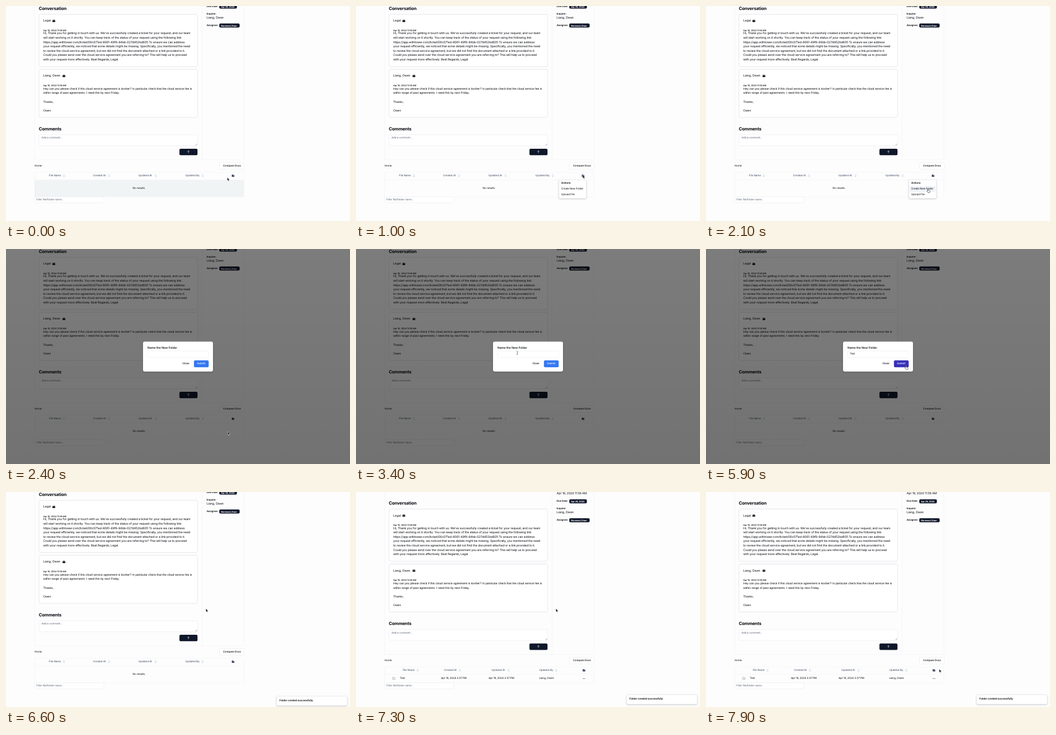
An HTML page that plays this animation: 600 by 375 pixels, repeating every 8 s.

```html
<!DOCTYPE html>
<html lang="en">
<head>
<meta charset="utf-8">
<title>New folder</title>
<style>
  html, body { margin: 0; height: 100%; overflow: hidden; background: #fdfdfd; }
  svg { display: block; width: 100vw; height: 100vh; }
  text {
    font: 4.55px Inter, sans-serif; letter-spacing: -.02em; fill: #05070c;
    dominant-baseline: central; text-rendering: geometricPrecision; white-space: pre;
  }
  .body { font-size: 5.23px; }
  .mail { font: 5.08px "Liberation Sans", Arial, sans-serif; letter-spacing: 0; fill: #000; }
  .head { font-size: 7.65px; font-weight: 700; }
  .date { font-size: 3.95px; font-weight: 500; }
  .label { font-size: 4.35px; font-weight: 600; }
  .badge { font-size: 3.85px; font-weight: 700; fill: #fff; }
  .medium { font-weight: 500; }
  .bold { font-weight: 600; }
  .column { font-weight: 500; fill: #566378; }
  .hint { fill: #566172; }
  .white { font-weight: 500; fill: #fff; }
  .card { fill: #fff; stroke: #e2e5ea; stroke-width: .5; }
  .line { fill: none; stroke: #eceef1; stroke-width: .5; }
  .icon { fill: none; stroke: #64748b; stroke-width: .5; }
  .shadow { filter: drop-shadow(0 .5px .6px #0003); }
  .float { filter: drop-shadow(0 1px 1.5px #0003); }
</style>
</head>
<body>
<svg id="stage" viewBox="0 0 600 375"></svg>
<script>
const LOOP = 8000, SHIFT = 15.2, INK = '#0f172a';
const PERSON = 'Liang, Owen';

const text = (x, y, str, cls = '', attrs = '') => `<text x="${x}" y="${y + .35}" class="${cls}" ${attrs}>${str}</text>`;
const lines = (x, y, step, rows, cls) => rows.map((row, i) => row && text(x, y + i * step, row, cls)).join('');
const rect = (x, y, x2, y2, attrs = 'class="card"', r = 2) =>
  `<rect x="${x}" y="${y}" width="${x2 - x}" height="${y2 - y}" rx="${r}" ${attrs}/>`;
const path = (d, attrs) => `<path d="${d}" ${attrs}/>`;
const group = (id, content) => `<g id="${id}">${content}</g>`;

const envelope = (x, y) => rect(x - 2.3, y - 1.8, x + 2.3, y + 1.8, 'fill="#05070c"', .5) +
  path(`M${x - 2} ${y - 1.1}l2 1.3 2-1.3`, 'fill="none" stroke="#fff" stroke-width=".45"');
const badge = (y, x2, str) => rect(372, y - 3.5, x2, y + 3.5, `fill="${INK}"`) + text(375, y - .2, str, 'badge');

function message(top, bottom, sender, iconX) {
  return rect(57.5, top, 334, bottom, 'class="card shadow"', 3) +
    text(65, top + 11.6, sender, 'body') + envelope(iconX, top + 11.6) +
    text(65, top + 27.3, 'Apr 19, 2024 11:58 AM', 'date');
}

function header(y, columns, iconX) {
  const titles = ['File Name', 'Created At', 'Updated At', 'Updated By'], gaps = [26, 28, 30, 30];
  return titles.map((title, i) => text(columns[i], y, title, 'column') +
    path(`M${columns[i] + gaps[i] - 1.1} ${y - .7}l1.1-1.1 1.1 1.1m-2.2 1.4l1.1 1.1 1.1-1.1`, 'class="icon"')).join('') +
    path(`M${iconX - 2.1} ${y - 1.9}h1.6l.6.7h2v3.1h-4.2z`, 'fill="#263352"') +
    path(`M${iconX - .9} ${y + .4}h1.8m-.9-.9v1.8`, 'stroke="#fff" stroke-width=".4"');
}

const page = rect(50, -30, 415, 268, 'class="line"', 0) + path('M342 -30V268', 'class="line"') +
  text(57.3, 4, 'Conversation', 'head') +
  message(14.5, 105.5, 'Legal', 83.4) +
  lines(65, 48, 7.6, [
    "Hi, Thank you for getting in touch with us. We've successfully created a ticket for your request, and our team",
    'will start working on it shortly. You can keep track of the status of your request using the following link:',
    'https://app.withtower.com/ticket/06c071ed-8061-49f8-94bb-027d452bd605 To ensure we can address',
    'your request efficiently, we noticed that some details might be missing. Specifically, you mentioned the need',
    'to review the cloud service agreement, but we did not find the document attached or a link provided to it.',
    'Could you please send over the cloud service agreement you are referring to? This will help us to proceed',
    'with your request more effectively. Best Regards, Legal'], 'body') +
  message(110.5, 194, PERSON, 101) +
  lines(65, 144.4, 7.6, [
    'Hey can you please check if this cloud service agreement is kosher? In particular check that the cloud service fee is',
    'within range of past agreements. I need this by next Friday.', '', 'Thanks,', '', 'Owen'], 'mail') +
  text(57.3, 214.3, 'Comments', 'head') +
  rect(57.5, 224.7, 334, 243.7) + text(62, 230.6, 'Add a comment...', 'hint') +
  path('M330.5 242.8l2.6-2.6m-1.2 2.6l1.2-1.2', 'class="icon"') +
  rect(302.5, 249, 334, 260.3, `fill="${INK}"`) +
  path('M318.2 256.7v-4.2m-1.7 1.7l1.7-1.7 1.7 1.7', 'fill="none" stroke="#fff" stroke-width=".6"') +
  text(350, -12.2, 'Apr 19, 2024 11:58 AM', 'body') +
  text(350, 1, 'Due Date:', 'label') + badge(1, 402.7, 'Apr 25, 2024') +
  text(350, 13.7, 'Inquirer:', 'label') + text(350, 20.7, PERSON, 'body') +
  text(350, 34, 'Assignee:', 'label') + badge(34, 407.5, 'Norwood, Evan') +
  text(50, 279, 'Home') + rect(372.5, 273.2, 415.5, 284.8) + text(378.6, 279, 'Compare Docs', 'medium');

const emptyTable = rect(50, 303.3, 415, 333, 'id="rowHover" fill="#f1f4f4"', 0) +
  rect(50, 290, 415, 333, 'class="line"', 1) + path('M50 303.3H415', 'class="line"') +
  header(296, [75, 151.7, 231, 313], 396) + text(221, 317.7, 'No results.');

const filledTable = rect(50, 305, 415, 333, 'class="line"', 1) + path('M50 318H415', 'class="line"') +
  header(311, [81.4, 153.3, 236.3, 319.4], 397.6) +
  path('M64 323.2h1.5l.5.6h2v3h-4z', 'class="icon"') + text(76.4, 325.2, 'Test') +
  text(148.3, 325.2, 'Apr 19, 2024 3:37 PM') + text(231.3, 325.2, 'Apr 19, 2024 3:37 PM') +
  text(319.4, 325.2, PERSON) +
  [-1.6, 0, 1.6].map(dx => `<circle cx="${397.7 + dx}" cy="325.2" r=".5" fill="${INK}"/>`).join('');

const menu = rect(354, 303.3, 401.5, 335.5, 'class="card float"') +
  rect(355.5, 314.2, 400, 324.2, 'id="itemHover" fill="#eef2f7"', 1) +
  text(358, 309, 'Actions', 'bold') + text(358, 319.2, 'Create New Folder') + text(358, 329.2, 'Upload File');

const dim = '<linearGradient id="dim" x2="0" y2="1"><stop stop-opacity=".51"/>' +
  '<stop offset="1" stop-opacity=".55"/></linearGradient>';
const dialog = dim + rect(0, 0, 600, 375, 'fill="url(#dim)"', 0) +
  rect(239, 161.5, 361, 213.7, 'fill="#fff" class="float"', 3) +
  text(246.8, 172.5, 'Name the New Folder', 'body medium') +
  rect(246.8, 177.9, 353.4, 189.3, 'id="field" fill="#fff"') +
  text(251, 183.5, '', '', 'id="typed"') + rect(0, 181, .5, 186.4, `id="caret" fill="${INK}"`, 0) +
  text(307.8, 200.1, 'Close', 'medium') +
  rect(327.8, 194.3, 353.5, 206.2, 'id="submit"') + text(333, 200.1, 'Submit', 'white');

const toast = rect(472, 353.7, 595, 370, 'class="card float"') +
  text(477, 361.4, 'Folder created successfully', 'bold');

const outline = 'stroke="#fff" stroke-width=".5" stroke-linejoin="round"';
const pointers = group('arrow', path('M0 0V5.6L1.3 4.4 2.2 6.4 3.2 6 2.3 4H4z', `fill="#000" ${outline}`)) +
  group('hand', path('M-.6 .3q.6-.7 1.2 0V2.4l2.6.6q.7.2.6 1L3.2 6.6H.2L-1.7 4q.3-.8 1.1-.2z',
    'fill="#fff" stroke="#000" stroke-width=".5"')) +
  group('beam', path('M-1-2.8q1 0 1 .7V2.1q0 .7-1 .7M1-2.8q-1 0-1 .7M1 2.8q-1 0-1-.7',
    'fill="none" stroke="#111" stroke-width=".5"'));

stage.innerHTML = group('content', page) + group('empty', emptyTable) + group('filled', filledTable) +
  rect(50, 332.7, 171, 343.2) + text(53, 337.8, 'Filter file/folder name...', 'hint') +
  group('actions', menu) + group('modal', dialog) + group('notice', toast) + group('pointer', pointers);

const $ = id => document.getElementById(id);
const show = (id, on) => $(id).setAttribute('display', on ? 'inline' : 'none');
const move = (id, x, y) => $(id).setAttribute('transform', `translate(${x} ${y})`);
const between = (t, a, b) => t >= a && t < b;

// Pointer stops: time, x, y
const stops = [[0, 386, 299.2], [500, 395.5, 295], [1200, 395.5, 295], [2000, 387, 319], [2400, 387, 318.7],
  [3200, 281, 174], [3500, 281.5, 184], [4850, 281.5, 184], [5500, 348.7, 203.5], [7500, 348.7, 203.5], [7900, 406.8, 309]];

function pointerAt(t) {
  const i = stops.findIndex(stop => stop[0] > t);
  if (i < 0) return stops.at(-1).slice(1);
  const [t0, x0, y0] = stops[i - 1], [t1, x1, y1] = stops[i];
  const p = (t - t0) / (t1 - t0), e = p * p * (3 - 2 * p);
  return [x0 + (x1 - x0) * e, y0 + (y1 - y0) * e];
}

function draw(t) {
  const created = t >= 7300, menuOpen = between(t, 700, 2400);
  const open = between(t, 2400, 6600), focused = between(t, 3700, 5900);
  const [x, y] = pointerAt(t);

  move('content', 0, created ? SHIFT : 0);
  show('empty', !created);
  show('filled', created);
  $('rowHover').setAttribute('opacity', Math.max(0, 1 - Math.max(0, t - 50) / 150));

  show('actions', menuOpen);
  $('actions').setAttribute('opacity', Math.min(1, (t - 650) / 150));
  const onItem = menuOpen && y > 313;
  show('itemHover', onItem);

  show('modal', open);
  const letters = Math.max(0, Math.min(4, Math.floor((t - 4000) / 100)));
  $('typed').textContent = 'Test'.slice(0, letters);
  $('field').setAttribute('stroke', focused ? '#111827' : '#e5e8ed');
  $('field').setAttribute('stroke-width', focused ? .75 : .5);
  show('caret', focused && (t < 4900 || t % 1000 < 500));
  $('caret').setAttribute('x', 251 + (letters && $('typed').getComputedTextLength()));
  const onSubmit = open && between(x, 328, 354) && between(y, 194, 206);
  $('submit').setAttribute('fill', onSubmit ? '#3730b8' : '#3477f0');

  show('notice', t >= 6600);
  move('notice', 0, t < 6700 ? 2.6 : 0);

  const onField = open && between(y, 178, 190) && between(x, 247, 354);
  const onLink = onSubmit || onItem || between(t, 350, 700);
  show('pointer', !between(t, 4100, 4900));
  show('beam', onField);
  show('hand', onLink);
  show('arrow', !onField && !onLink);
  move('pointer', x, y);
}

function tick() {
  draw(performance.now() % LOOP);
  requestAnimationFrame(tick);
}
tick();
</script>
</body>
</html>
```
